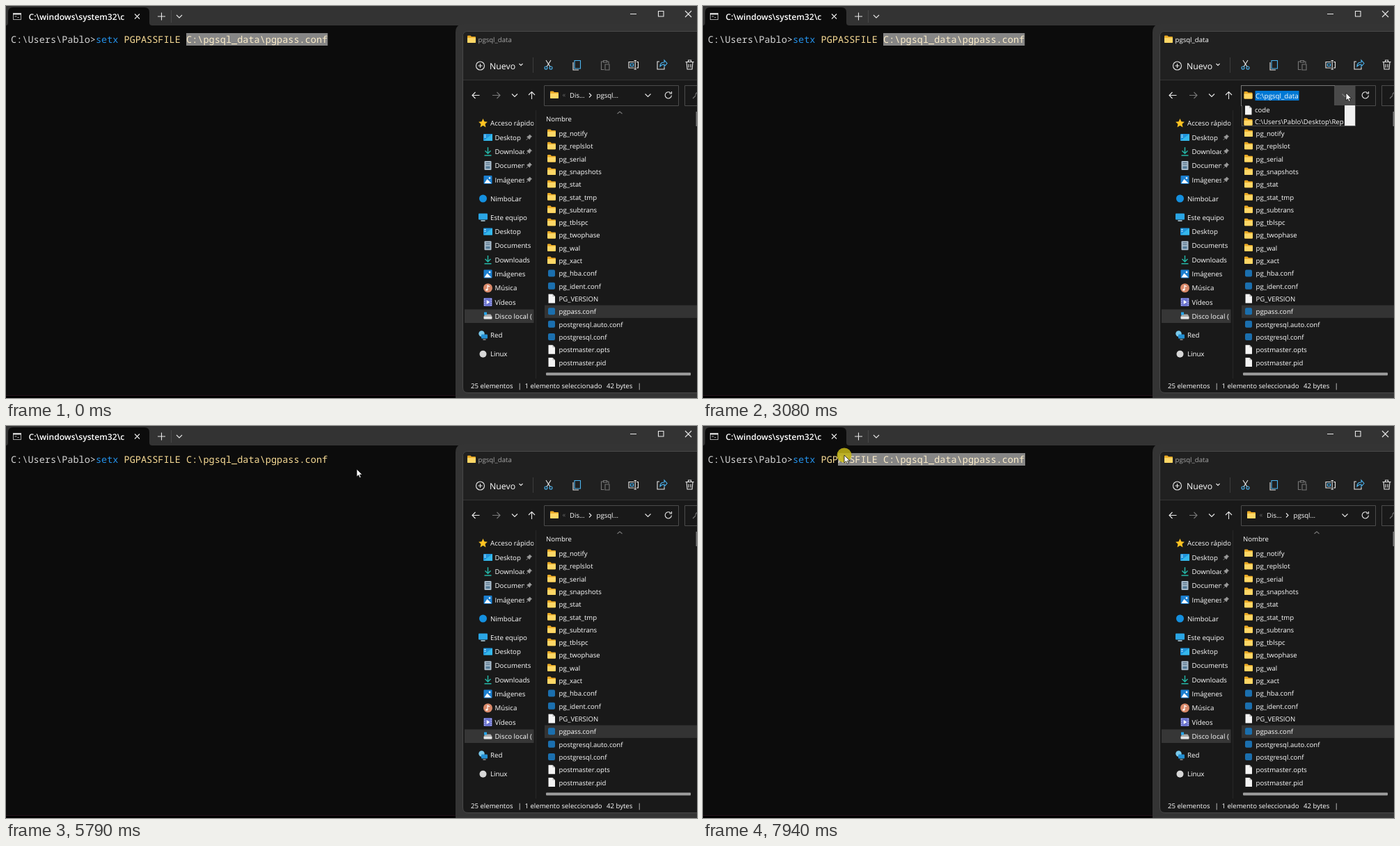
Recreate the animation shown at these times as an HTML page. Size 993 by 564 pixels, loop 8000 ms.

```html
<!DOCTYPE html>
<html lang="es">
<head>
<meta charset="utf-8">
<title>setx PGPASSFILE</title>
<style>
html, body { margin: 0; width: 100%; height: 100%; overflow: hidden; background: #0c0c0c; }
svg { display: block; width: 993px; height: 564px; }
text { font: 9.6px "Open Sans", "Noto Sans", sans-serif; fill: #fff; white-space: pre; text-rendering: geometricPrecision; }
#tree text { font-size: 9.7px; }
.mono { font: 13.55px "Noto Sans Mono", "DejaVu Sans Mono", monospace; fill: #d6d6d6; }
.line { fill: none; stroke: #e8e8e8; stroke-width: 1.1; }
.blue { stroke: #4cb4f0; }
.dim { stroke: #777; }
</style>
</head>
<body>
<svg viewBox="0 0 993 564">
  <defs>
    <g id="folder"><path d="M-6-4.5q0-1 1-1h3.4l1.6 1.6H5q1 0 1 1V4q0 1-1 1H-5q-1 0-1-1z" fill="#e9a824"/><path d="M-6-2.2H6V4q0 1-1 1H-5q-1 0-1-1z" fill="#ffd766"/></g>
    <g id="file"><path d="M-4.5-6.5h6l3.5 3.5v9.5h-9.5z" fill="#f4f4f4"/><path d="M1.5-6.5v3.5h3.5z" fill="#b8b8b8"/></g>
    <rect id="conf" x="-5" y="-5" width="10" height="10" rx="2" fill="#1b6fae"/>
    <path id="star" d="M0-6.5 1.9-2.2 6.4-1.8 3 1.3 4 6 0 3.5-4 6-3 1.3-6.4-1.8-1.9-2.2z" fill="#ffc322"/>
    <g id="desktop"><rect x="-6.5" y="-5" width="13" height="10" rx="1" fill="#1f94dc"/><path d="M-6.5 5 6.5-5V5z" fill="#35b8ec"/><path d="M-5-3h2M-5-.5h2" stroke="#fff"/></g>
    <path id="down" d="M0-6V3M-4-1 0 3 4-1M-5 5.8H5" fill="none" stroke="#25b5a5" stroke-width="1.5"/>
    <g id="docs"><rect x="-5" y="-6.5" width="10" height="13" rx="1" fill="#a9bccb"/><path d="M-3-4H3M-3-1.5H3" stroke="#426078"/><rect x="-3" y="1" width="6" height="3.5" fill="#537a96"/></g>
    <g id="image"><rect x="-6" y="-6" width="12" height="12" rx="1" fill="#1b7fd0"/><path d="M-5 5-1-1 5 5z" fill="#fff"/><circle cx="2.5" cy="-2.5" r="1.3" fill="#fff"/></g>
    <circle id="cloud" r="5.5" fill="#1490df"/>
    <g id="pc"><rect x="-6.5" y="-5.5" width="13" height="9" rx="1" fill="#2aa5e4"/><path d="M-3 5H3" stroke="#b9d8e8" stroke-width="1.5"/></g>
    <g id="music"><circle r="6.5" fill="#d9896a"/><path d="M-.5 2.5V-3.5L2.5-2" fill="none" stroke="#fff" stroke-width="1.2"/><circle cx="-1.7" cy="2.5" r="1.5" fill="#fff"/></g>
    <g id="video"><rect x="-6" y="-6" width="12" height="12" rx="1" fill="#6b73d0"/><path d="M-4.7-5V5M4.7-5V5" stroke="#dfe2ff" stroke-dasharray="1.5"/><path d="M-1.8-3 2.8 0-1.8 3z" fill="#fff"/></g>
    <g id="disk"><path d="M-6 0-4-3H4L6 0z" fill="#aaa"/><rect x="-6" y="0" width="12" height="4" rx="1" fill="#e4e4e4"/><rect x="-5.5" y="-6" width="4" height="4" fill="#27a5e8"/></g>
    <g id="net"><circle cx="-2" cy="-2" r="4.2" fill="#79c9ec"/><rect x="-2.5" y="-1" width="9" height="6" rx="1" fill="#238fd2"/><path d="M0 6.5H4" stroke="#ccc"/></g>
    <circle id="linux" r="5" fill="#d8d8d8"/>
    <path id="pin" d="M1-4 4-1 2.5-.5.8 2.8-2.8-.8.5-2.5zM-1 1-4 4" fill="#9a9a9a" stroke="#9a9a9a" stroke-width=".8"/>
    <path id="chev" d="M-4-2 0 2 4-2"/>
    <clipPath id="nav"><rect x="657" y="150" width="101.500" height="385"/></clipPath>
    <clipPath id="pinned"><rect x="657" y="150" width="88" height="385"/></clipPath>
    <clipPath id="dropClip"><rect id="dropBox" x="774" y="143" width="164" height="0"/></clipPath>
  </defs>

  <!-- terminal -->
  <rect width="993" height="564" fill="#0c0c0c"/>
  <rect width="993" height="28" fill="#333"/>
  <path d="M0 28q3 0 3-4V9q0-7 7-7H199q7 0 7 7v15q0 4 4 4z" fill="#0c0c0c"/>
  <rect y="560" width="993" height="4" fill="#000"/>
  <path d="M0 560.5H646" stroke="#24121a"/>
  <rect x="10.500" y="10.500" width="11" height="9" fill="#0a0a0a" stroke="#a8a8a8"/>
  <path d="M10 11.500H22" stroke="#ddd" stroke-width="2"/>
  <path d="M12.500 15h3M16.500 16.500h2" stroke="#ddd" stroke-width=".8"/>
  <text x="32.500" y="20" style="font-size:12.1px;font-weight:600">C:\windows\system32\c</text>
  <path class="line" d="M185 11.500l7 7m0-7l-7 7M218 15h11M223.500 9.500v11M897 11.500h9M937.500 7.500h7.500v7.500h-7.500zM976 7l9 9m0-9l-9 9"/>
  <path d="M237.500 6v18" stroke="#484848"/>
  <use href="#chev" class="line" x="249" y="15"/>
  <text class="mono" x="7" y="52.500">C:\Users\Pablo&gt;<tspan fill="#2492ea">setx</tspan> <tspan fill="#f9dc96">PGPASSFILE C:\pgsql_data\pgpass.conf</tspan></text>
  <rect id="sel" y="39" height="18" fill="#fff" opacity=".5"/>
  <rect id="caret" x="462" y="39" width="1" height="18" fill="#fff"/>

  <!-- explorer -->
  <path d="M646 564V38q0-12 12-12H993V564z" fill="#343434"/>
  <path d="M993 36.500H664q-7.500 0-7.500 7.500V549q0 7.500 7.500 7.500H993" fill="#191919" stroke="#484848"/>
  <path d="M993 37H664q-7 0-7 7V106H993z" fill="#202020"/>
  <path d="M657 106.500H993" stroke="#343434"/>
  <use href="#folder" x="669" y="48"/>
  <text id="title" x="678.500" y="52">pgsql_data</text>

  <g class="line">
    <circle cx="681.500" cy="86" r="6"/><path d="M678.500 86h6M681.500 83v6"/>
    <path d="M737.500 83l2.500 2.500 2.500-2.500"/>
    <path d="M757.500 74V96" stroke="#3c3c3c"/>
    <path d="M776 78l6 9.500M783 78l-6 9.500"/>
    <g class="blue"><circle cx="776" cy="89" r="2"/><circle cx="783" cy="89" r="2"/>
      <path d="M817 78.500h8.500v11.500h-8.500z"/><path d="M897.500 83h4v3.500h-4z"/><path d="M940 85q1-4 6-4V78l4 4.500-4 4.500V84q-4 0-6 3z"/></g>
    <path d="M815 81v11h8"/>
    <g class="dim"><path d="M859 80h-3.500v11.500h4M863 80h3v3M858.500 78.500h5v2.500h-5zM861 84h6v8h-6z"/></g>
    <path d="M902.500 80.500h-7.500v8.500h7.500M906 80.500h2.500v8.500h-2.500M902.500 78.500h3.500M904.200 78.500v12.500M902.500 91h3.500M939 80h-3v11h10v-3"/>
    <path d="M976.500 80.500h12M978 80.500l1 10.500h7l1-10.500M980.500 80v-2h4v2M981 83.500v5M984 83.500v5"/>
    <path d="M680.500 128.500h-10.500M674.500 124l-4.500 4.500 4.500 4.500M755.500 134v-10.500M751 128l4.500-4.500 4.500 4.500"/>
    <path class="dim" d="M699 128.500h11M705.500 124l4.500 4.500-4.500 4.500"/>
    <use href="#chev" x="731" y="128.500"/>
    <path d="M774 114.500H966.500V143.500H773.500V114.500M993 114.500H975.500V143.500H993" stroke="#4c4c4c" stroke-width="1"/>
    <path class="dim" d="M987 133l4-4M993 124.500a4 4 0 0 0-2 4"/>
    <path d="M955 125a4.600 4.600 0 1 0 1.400 3.500M956.500 123v3h-3.200"/>
  </g>
  <text x="695" y="90.500" style="font-size:12.3px">Nuevo</text>

  <g id="crumbs">
    <use href="#folder" x="788" y="128"/>
    <text x="799.500" y="131" style="fill:#666">«</text>
    <text x="810" y="132">Dis...</text>
    <path class="line" d="M838 125.500l3 3-3 3"/>
    <text x="848.500" y="132">pgsql...</text>
  </g>
  <g id="edit">
    <rect x="773.500" y="114.500" width="134.500" height="29" fill="#191919" stroke="#777"/>
    <rect id="dropBtn" x="908.500" y="114.500" width="28.500" height="29" stroke="#4c4c4c"/>
    <use id="editIcon" href="#folder" x="783.500" y="128.500"/>
    <rect x="793.500" y="122" width="63" height="14" fill="#0078d4"/>
    <text x="794" y="132.500" style="font-size:9.8px">C:\pgsql_data</text>
  </g>
  <use href="#chev" id="addrChev" class="line" x="922.500" y="128.500"/>

  <path d="M761.500 150V536" stroke="#272727"/>
  <rect x="659" y="436.500" width="99.500" height="19.500" fill="#363636"/>
  <g id="tree"></g>

  <text x="776" y="166">Nombre</text>
  <path class="line dim" d="M878.500 155l3.500-3 3.500 3"/>
  <rect x="991.500" y="152" width="1.500" height="21" fill="#777"/>
  <rect x="774" y="430.500" width="219" height="18.300" fill="#333"/>
  <rect id="hover" x="774" width="219" height="18.300" fill="#4d4d4d"/>
  <g id="files"></g>
  <rect x="776" y="527.500" width="208" height="4" rx="1" fill="#9d9d9d"/>
  <path id="arrow" d="M766 529.500l4-2.500v5z" fill="#555"/>
  <g id="status"></g>

  <g clip-path="url(#dropClip)">
    <g id="drop">
      <rect x="774.500" y="143.500" width="163" height="154" fill="#191919" stroke="#555"/>
      <g id="recent"></g>
      <rect x="922" y="143" width="15" height="154" fill="#f0f0f0"/>
      <rect x="923" y="158" width="13" height="60" fill="#cdcdcd"/>
    </g>
  </g>

  <g id="mouse">
    <circle id="press" r="10.500" fill="#c6b716" opacity=".85"/>
    <path d="M0 0V11L2.600 8.700 4.300 12.500 6.200 11.700 4.500 8H8z" fill="#fff" stroke="#111" stroke-width=".8"/>
  </g>
</svg>
<script>
const LOOP = 8000, CELL = 8.13, LEFT = 7, ROW = 18.31, LIST_TOP = 174.4, DROP = 155;
const $ = id => document.getElementById(id);
const text = (x, y, s, attrs = '') => `<text x="${x}" y="${y + 3.5}" ${attrs}>${s}</text>`;
const icon = (id, x, y) => `<use href="#${id}" x="${x}" y="${y}"/>`;

// Navigation tree: icon, label, centre height, level (2 = pinned)
const tree = [
  ['star', 'Acceso rápido', 168.5, 0],
  ['desktop', 'Desktop', 189, 2], ['down', 'Downloads', 209.3, 2],
  ['docs', 'Documents', 229.5, 2], ['image', 'Imágenes', 250, 2],
  ['cloud', 'NimboLar', 277, 0], ['pc', 'Este equipo', 304, 0],
  ['desktop', 'Desktop', 324.5, 1], ['docs', 'Documents', 344.8, 1],
  ['down', 'Downloads', 365, 1], ['image', 'Imágenes', 385.4, 1],
  ['music', 'Música', 405.7, 1], ['video', 'Vídeos', 426, 1],
  ['disk', 'Disco local (', 446.5, 1],
  ['net', 'Red', 473.5, 0], ['linux', 'Linux', 500.7, 0]
];
$('tree').innerHTML = tree.map(([id, label, y, level]) =>
  icon(id, level ? 692.5 : 685.5, y) +
  text(level ? 702.5 : 696, y, label, `clip-path="url(#${level === 2 ? 'pinned' : 'nav'})"`) +
  (level === 2 ? icon('pin', 751.5, y) : '')).join('');

const folders = 'notify replslot serial snapshots stat stat_tmp subtrans tblspc twophase wal xact'
  .split(' ').map(s => 'pg_' + s);
const files = 'pg_hba.conf pg_ident.conf PG_VERSION pgpass.conf postgresql.auto.conf postgresql.conf postmaster.opts postmaster.pid'.split(' ');
$('files').innerHTML = [...folders, ...files].map((name, i) => {
  const y = 183.5 + i * ROW;
  const kind = i < folders.length ? 'folder' : name.endsWith('.conf') ? 'conf' : 'file';
  return icon(kind, 784, y - 0.5) + text(794.5, y, name);
}).join('');

$('status').innerHTML = [[668, '25 elementos'], [735.5, '|'], [745.5, '1 elemento seleccionado'],
  [863, '42 bytes'], [907.5, '|']].map(([x, s]) => text(x, 546, s)).join('');

const recent = ['C:\\pgsql_data', 'C:\\pgsql', 'C:\\pgsql\\bin', 'C:\\Users\\Pablo\\Documents',
  'C:\\Users\\Pablo\\Downloads', 'cmd', 'C:\\Users\\Pablo', 'code', 'C:\\Users\\Pablo\\Desktop\\Rep'];
$('recent').innerHTML = recent.map((s, i) => {
  const y = 156.5 + i * 16.9;
  return icon(s.includes('\\') ? 'folder' : 'file', 783.5, y) + text(793, y, s);
}).join('');

// Pointer path: time, x, y
const path = [
  [390, 842, 546], [530, 838, 500], [740, 834, 457], [950, 829, 446], [1160, 826, 440],
  [1230, 825, 440], [1500, 815, 440], [1900, 815, 440], [1970, 880, 285], [2040, 944, 128],
  [2170, 947, 124], [2310, 944, 127], [2700, 924, 127], [3080, 924, 125], [3150, 925, 125],
  [3500, 947, 120], [3800, 926, 125], [3970, 924, 125], [4100, 921, 125], [4400, 858, 122],
  [4580, 846, 121], [4780, 846, 121], [4900, 720, 99], [5030, 550, 69], [5130, 504, 62],
  [6340, 504, 62], [6600, 476, 50], [6820, 462, 46], [6960, 461, 46], [7110, 384, 43],
  [7310, 290, 42], [7540, 228, 41], [7800, 199, 41], [7940, 203, 42]
];

function pointer(t) {
  const i = path.findIndex(p => p[0] > t);
  if (i < 0) return path[path.length - 1].slice(1);
  if (i === 0) return path[0].slice(1);
  const [t0, x0, y0] = path[i - 1], [t1, x1, y1] = path[i];
  const k = (t - t0) / (t1 - t0);
  return [x0 + (x1 - x0) * k, y0 + (y1 - y0) * k];
}

const within = (t, a, b) => t >= a && t < b;
const show = (id, on) => { $(id).style.display = on ? '' : 'none'; };
const set = (id, name, value) => $(id).setAttribute(name, value);

function draw(t) {
  const [x, y] = pointer(t);
  const shown = t >= 390;
  show('mouse', shown);
  set('mouse', 'transform', `translate(${x} ${y})`);
  show('press', within(t, 2860, 3010) || within(t, 3960, 4060) || within(t, 5270, 5400) || t >= 6960);

  const row = Math.floor((y - LIST_TOP) / ROW);
  show('hover', shown && x > 774 && row >= 0 && row < 19);
  set('hover', 'y', LIST_TOP + row * ROW);
  show('arrow', within(t, 460, 1970));

  const active = within(t, 2870, 5300), editing = within(t, 2940, 5300);
  $('title').style.fill = active ? '#fff' : '#a6a6a6';
  show('crumbs', !editing);
  show('edit', editing);
  set('dropBtn', 'fill', t < 4000 ? '#4a4a4a' : '#191919');
  set('editIcon', 'opacity', t < 4000 ? 1 : 0.65);
  set('addrChev', 'opacity', editing && t < 4000 ? 0.35 : 1);

  const open = within(t, 3045, 3990) ? Math.min(1, (t - 3045) / 185) * DROP : 0;
  set('dropBox', 'height', open);
  set('drop', 'transform', `translate(0 ${open - DROP})`);

  const drag = t >= 6960;
  const from = drag ? Math.min(56, Math.floor((x - LEFT - 4) / CELL)) : 31;
  const start = LEFT + from * CELL;
  show('sel', t < 5270 || drag);
  set('sel', 'x', start);
  set('sel', 'width', (drag ? 463 : 462.3) - start);
  show('caret', within(t, 5270, 5790) || within(t, 6340, 6960));
}

function tick() {
  draw(performance.now() % LOOP);
  requestAnimationFrame(tick);
}
tick();
</script>
</body>
</html>
```
